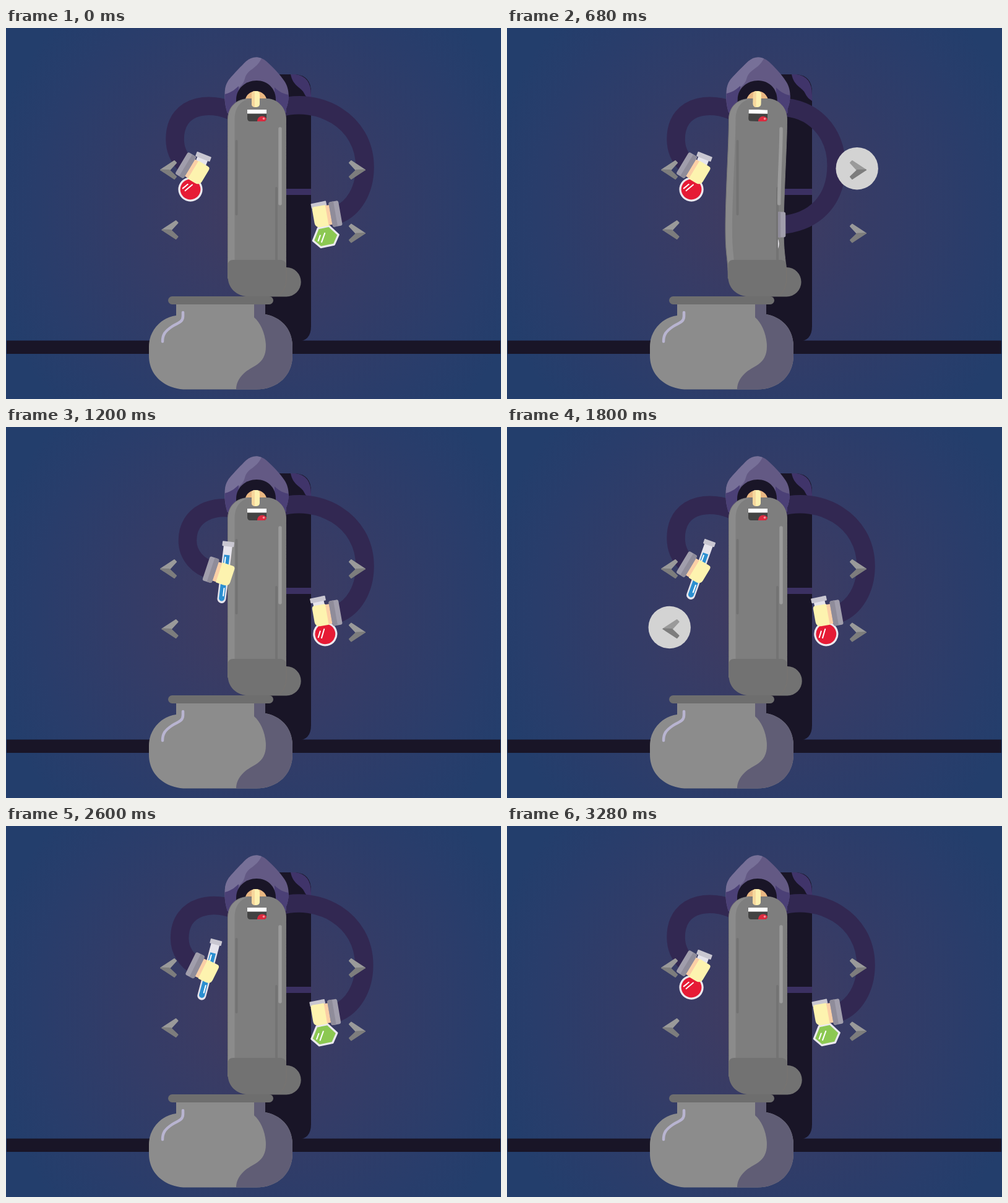
Animation, 800 px wide and 600 px high, one loop 3.8 s. Source, as an HTML page:

```html
<!DOCTYPE html>
<html lang="en">
<head>
<meta charset="utf-8">
<title>Potion mixer</title>
<style>
html, body { margin: 0; width: 100%; height: 100%; overflow: hidden; background: #263e6d; }
svg { display: block; width: 800px; height: 600px; }
.arm { fill: none; stroke: #322852; stroke-width: 29.5; }
.glass { fill: #e6e4ec; }
.cap { fill: #c9c7d1; }
.shine { fill: none; stroke: #fff; stroke-width: 2; stroke-linecap: round; }
.press { fill: #d3d3d3; }
</style>
</head>
<body>
<svg viewBox="0 0 800 600">
  <defs>
    <radialGradient id="night" gradientUnits="userSpaceOnUse" cx="410" cy="300" r="450">
      <stop offset="0" stop-color="#413b60"/>
      <stop offset=".45" stop-color="#343c67"/>
      <stop offset=".8" stop-color="#293d6b"/>
      <stop offset="1" stop-color="#233e6c"/>
    </radialGradient>
    <clipPath id="leftSide"><rect width="370" height="600"/></clipPath>
    <clipPath id="rightSide"><rect x="438" width="362" height="600"/></clipPath>
    <clipPath id="mouthClip"><path d="M390 132H421V146Q421 151 416 151H395Q390 151 390 146Z"/></clipPath>

    <g id="arrow" stroke-width="2" stroke-linejoin="round">
      <path d="M250 229.500L272 215L275 218L264 230Z" fill="#9a9a9a" stroke="#9a9a9a"/>
      <path d="M250 229.500L264 230L275 240.500L272 244Z" fill="#7d7d7d" stroke="#7d7d7d"/>
    </g>

    <g id="red">
      <rect class="glass" x="-9" y="0" width="18" height="45"/>
      <rect class="cap" x="-12.500" y="-4" width="25" height="8" rx="1"/>
      <circle cy="57" r="18" fill="#e61b35" stroke="#ebe9ef" stroke-width="3.200"/>
      <path class="shine" d="M-12 60L-7 51M-7 62L0 49"/>
    </g>
    <g id="green" transform="translate(0 7)">
      <rect class="glass" x="-9" y="0" width="18" height="38"/>
      <rect class="cap" x="-12.500" y="-4" width="25" height="8" rx="1"/>
      <path d="M-9 37H9L21 54L11 68H-11L-21 55Z" fill="#8cc852" stroke="#ebe9ef" stroke-width="3.200" stroke-linejoin="round"/>
      <path class="shine" d="M-13 57L-8 49M-8 60L0 47"/>
    </g>
    <g id="blue" transform="translate(0 -22) rotate(-2)">
      <path class="glass" d="M-7 0H7V89.500A7 7 0 0 1 -7 89.500Z"/>
      <path d="M-4.500 18H4.500V88.500A4.500 4.500 0 0 1 -4.500 88.500Z" fill="#2b8fd0"/>
      <path class="shine" d="M-2 22V32M2 72V84" stroke-width="1.500"/>
      <rect class="cap" x="-9.500" y="-4" width="19" height="8" rx="1"/>
    </g>

    <g id="hand">
      <rect x="5" y="-16" width="16" height="32" rx="3" fill="#fbcfa6"/>
      <path d="M14 -17H32Q36 -17 36 -12V9Q36 17 27 17H14Z" fill="#fdf3af"/>
      <rect x="-8" y="-20.500" width="16" height="41" rx="3" fill="#a19eac"/>
      <path d="M0 -20.500H5Q8 -20.500 8 -17.500V17.500Q8 20.500 5 20.500H0Z" fill="#8f8c9a"/>
    </g>
  </defs>

  <rect width="800" height="600" fill="url(#night)"/>
  <rect x="1" y="505.500" width="798" height="21.500" fill="#191527"/>
  <path d="M400 75H468Q493 77 493 104V482Q493 507 470 507H400Z" fill="#191527"/>
  <path d="M460 75H468Q493 78 493 108V118Q485 113 482 106C478 96 464 95 460 75Z" fill="#40346a"/>
  <rect x="440" y="260" width="53" height="10" fill="#3b3062"/>

  <path id="leftArm" class="arm"/>
  <path id="rightArm" class="arm"/>

  <circle id="lowPress" class="press" cx="262.700" cy="324" r="34.200"/>
  <circle id="highPress" class="press" cx="565.700" cy="227.200" r="34.200"/>
  <use href="#arrow"/>
  <use href="#arrow" transform="translate(2.500 97)"/>
  <use href="#arrow" transform="translate(830 0) scale(-1 1)"/>
  <use href="#arrow" transform="translate(830 102.500) scale(-1 1)"/>

  <g id="hood">
    <path d="M358 138C352 120 351 98 360 84C370 72 380 62 388 54C398 45.500 412 45.500 421 54C430 62 442 74 450 86C459 99 458 118 453 130V137Z" fill="#635984"/>
    <path d="M354 108C370 101 383 95 386 82C390 66 404 68 413 49C404 45.500 396 47 388 54C380 62 370 72 360 84C355 91 353 99 354 108Z" fill="#777098"/>
    <path d="M354 107C366 104 371 98 376 94L374 130L358 138C355 128 353 118 354 107ZM434 96C442 104 450 107 457 108C457 117 455 125 453 130V137H434Z" fill="#4b4076"/>
    <path d="M372 125V116C372 97 388 85 405 85C423 85 436 98 436 116V125Z" fill="#191527"/>
    <path d="M386 118C388 107 396 102 404 102C412 102 420 107 422 118Z" fill="#e9b782"/>
  </g>

  <path id="torso" fill="#8b8b8b" stroke="#777" stroke-width="1"/>
  <path id="panel" fill="#7e7e7e"/>
  <path d="M372.500 183V301M437 259V386" stroke="#737373" stroke-width="4" stroke-linecap="round"/>
  <path id="gleam" fill="none" stroke="#9b9b9b" stroke-width="5.500" stroke-linecap="round"/>
  <g id="boot" fill="#727272">
    <path d="M358.500 383Q359 375 367 375H445Q453 376 453 387A23.700 23.700 0 0 1 453 434.500H394C372 434.500 358.500 420 358.500 402Z"/>
    <path d="M453 387V408Q452 424 440 434" fill="none" stroke="#797470"/>
  </g>

  <g id="face">
    <g clip-path="url(#mouthClip)">
      <rect x="390" y="132" width="31" height="20" fill="#434343"/>
      <rect x="390" y="132" width="31" height="6.500" fill="#fff"/>
      <circle cx="414" cy="150.500" r="8" fill="#dc2b40"/>
      <circle cx="416.500" cy="146.500" r="1.800" fill="#f58f98"/>
    </g>
    <rect x="397" y="102" width="13" height="26" rx="5" fill="#fdf0b0"/>
    <path d="M402 102A5 5 0 0 0 397 107V123A5 5 0 0 0 402 128Z" fill="#f6d79d"/>
  </g>

  <g clip-path="url(#leftSide)"><g id="leftHand">
    <g transform="translate(319 208) rotate(21.600)"><use id="leftFlask"/></g>
    <use href="#hand" transform="translate(290.500 222) rotate(31)"/>
  </g></g>
  <g clip-path="url(#rightSide)"><g id="rightHand">
    <g transform="translate(504 279) rotate(-12)"><use id="rightFlask"/></g>
    <use href="#hand" transform="translate(532.500 300.500) rotate(-10) scale(-1 1)"/>
  </g></g>

  <path d="M275 446V465C250 468 231 490 231 515V530C231 563 258 584.500 292 584.500H404C440 584.500 463 561 463 530V515C463 488 446 468 419 463V446Z" fill="#8c8c8c"/>
  <path d="M401 446V468C412 477 420 497 420 515C420 545 397 546 384 559C375 568 372 576 372 584.500H404C440 584.500 463 561 463 530V515C463 488 446 468 419 463V446Z" fill="#605d75"/>
  <rect x="262" y="434" width="170" height="13" rx="6.500" fill="#6e6e6e"/>
  <path d="M286 460V466C286 477 276 477 268 483C256 491 253 497 253 507" fill="none" stroke="#b8b4d0" stroke-width="4.500" stroke-linecap="round"/>
</svg>
<script>
const $ = id => document.getElementById(id);
const LOOP = 3800, STEP = 40;

// each reach: start, hidden moment, end
const reaches = {
  right: [[240, 640, 1040], [1800, 2240, 2640]],
  left: [[720, 1060, 1360], [2480, 2880, 3280]]
};
const presses = { lowPress: [80, 1800], highPress: [600, 2360] };
const PRESS_TIME = 160;

// arm paths as point lists: resting and tucked behind the body
const arms = {
  left: {
    rest: [375, 140, 340, 117, 273, 118, 273, 180, 273, 200, 283, 214, 291, 222],
    tuck: [375, 128, 335, 130, 310, 155, 310, 187, 310, 215, 335, 236, 364, 238],
    from: [290.5, 222], to: [364, 238], turn: -23
  },
  right: {
    rest: [440, 130, 505, 110, 580, 150, 580, 225, 580, 262, 562, 292, 536, 302],
    tuck: [440, 128, 495, 128, 531, 170, 531, 222, 531, 280, 495, 315, 440, 319],
    from: [532.5, 300.5], to: [440, 318.5], turn: 10
  }
};

const mix = (a, b, u) => a + (b - a) * u;
const ease = p => (1 - Math.cos(Math.PI * Math.min(1, Math.max(0, p)))) / 2;

function tucked(side, t) {
  for (const [a, m, b] of reaches[side])
    if (t >= a && t < b) return t < m ? ease((t - a) / (m - a)) : ease((b - t) / (b - m));
  return 0;
}

// short push on the body just after a hand is hidden
function push(side, t) {
  return reaches[side].reduce((sum, [, m]) => {
    const d = (t - m - 40) / 100;
    return sum + (Math.abs(d) < 1 ? Math.cos(d * Math.PI / 2) ** 2 : 0);
  }, 0);
}

function poseArm(side, u) {
  const { rest, tuck, from, to, turn } = arms[side];
  const p = rest.map((v, i) => mix(v, tuck[i], u).toFixed(2));
  $(side + 'Arm').setAttribute('d', `M${p.slice(0, 2)}C${p.slice(2)}`);
  const x = mix(from[0], to[0], u), y = mix(from[1], to[1], u);
  $(side + 'Hand').setAttribute('transform',
    `translate(${x} ${y}) rotate(${turn * u}) translate(${-from[0]} ${-from[1]})`);
}

function poseBody(r, l) {
  const b = -5.5 * r + 5 * l, y = r > l ? 325 : 245;
  const foot = -1.2 * r;
  const down = x => `C${x},190 ${x + b},${y - 55} ${x + b},${y}C${x + b},${y + 45} ${x + foot},370 ${x + foot},405`;
  const up = x => `C${x + foot},370 ${x + b},${y + 45} ${x + b},${y}C${x + b},${y - 55} ${x},190 ${x},148`;
  $('torso').setAttribute('d', `M358.500,148${down(358.5)}H${452.5 + foot}${up(452.5)}C452.500,128 438,114.500 421,114.500H392C372,114.500 358.500,128 358.500,148Z`);
  $('panel').setAttribute('d', `M369.500,148${down(369.5)}H${452 + foot}${up(452)}C452,128 438,115 421,115H394C378,117 369.500,130 369.500,148Z`);
  $('gleam').setAttribute('d', `M443,163C443,200 ${443 + b * .6},240 ${443 + b * .6},284`);
  $('boot').setAttribute('transform', `translate(${foot} 0)`);
  const tilt = `rotate(${1.2 * r - 1.8 * l} 405 150)`;
  $('hood').setAttribute('transform', tilt);
  $('face').setAttribute('transform', tilt);
}

function hold(side, t, first, second) {
  const [[, a], [, b]] = reaches[side];
  $(side + 'Flask').setAttribute('href', '#' + (t >= a && t < b ? second : first));
}

function draw(now) {
  const t = Math.floor(now % LOOP / STEP) * STEP;
  poseArm('left', tucked('left', t));
  poseArm('right', tucked('right', t));
  poseBody(push('right', t), push('left', t));
  hold('left', t, 'red', 'blue');
  hold('right', t, 'green', 'red');
  for (const id in presses) {
    const on = presses[id].some(s => t >= s && t < s + PRESS_TIME);
    $(id).setAttribute('visibility', on ? 'visible' : 'hidden');
  }
}

const begin = performance.now();
function tick() {
  draw(performance.now() - begin);
  requestAnimationFrame(tick);
}
tick();
</script>
</body>
</html>
```
